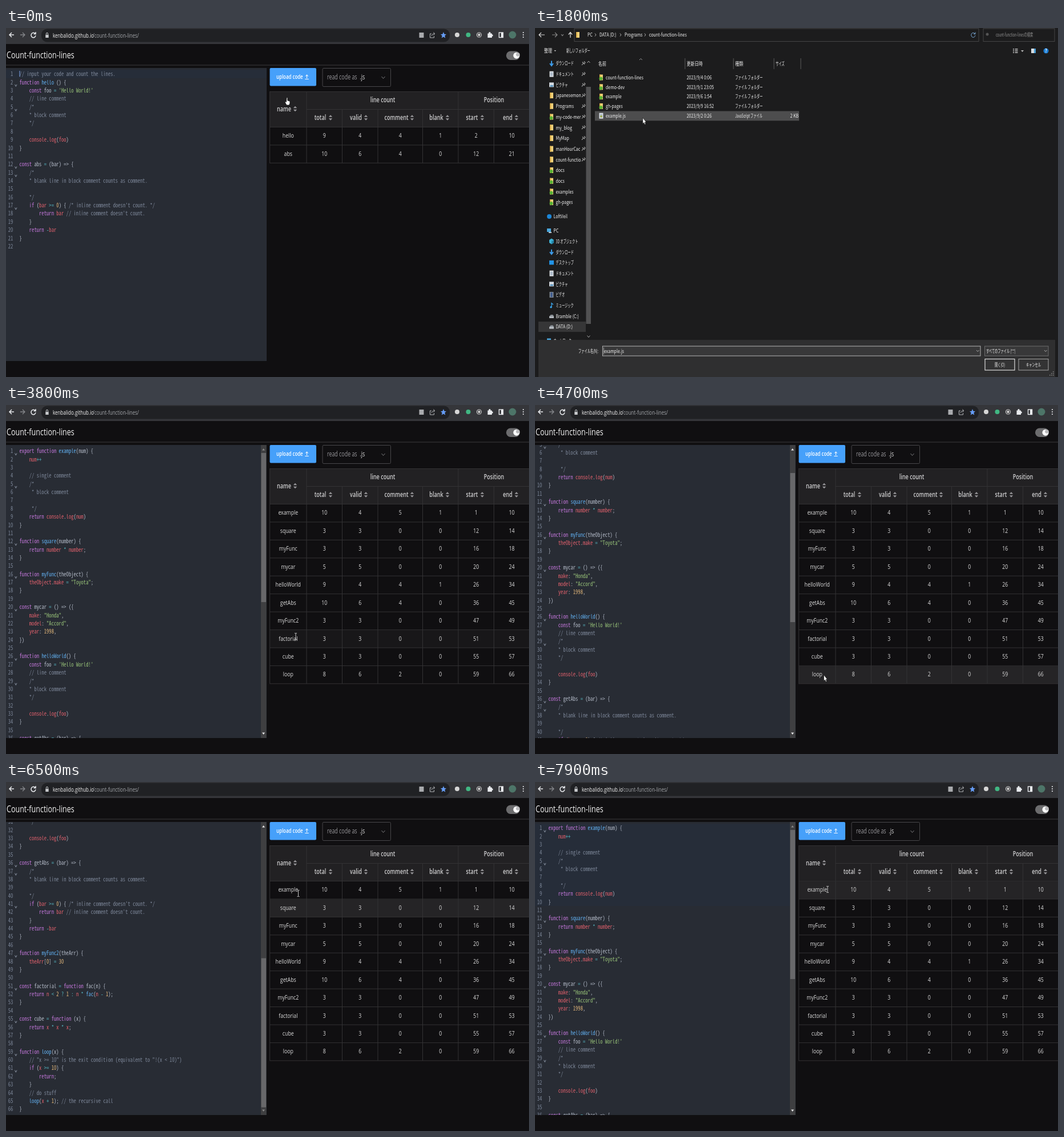
An HTML page for the animation above (8000 ms loop, 917 by 611 pixels).

```html
<!DOCTYPE html>
<html lang="en">
<head>
<meta charset="utf-8">
<title>Count-function-lines</title>
<style>
html, body { margin: 0; width: 100%; height: 100%; overflow: hidden; background: #100f11; }
svg { display: block; }
text { font-family: "Open Sans", "Noto Sans", sans-serif; white-space: pre; }
.ja { font-family: "Noto Sans CJK JP", "Noto Sans", sans-serif; }
.code { font-family: "Noto Sans Mono CJK JP", "Noto Sans Mono", monospace; font-size: 10.2px; fill: #b4bbc8; }
.com { fill: #7d8799; }
.str { fill: #98c379; }
.key { fill: #c678dd; }
.num { fill: #e5b97b; }
.op { fill: #56b6c2; }
.fn { fill: #61afef; }
.var { fill: #e0606c; }
</style>
</head>
<body>
<svg id="stage" width="917" height="611" viewBox="0 0 917 611" xmlns="http://www.w3.org/2000/svg"></svg>
<script>
const LOOP = 8000, LINE = 14.37, ROW = 31.44, SCROLL = 442;
const COLS = [462.5, 527, 589.5, 652, 730.5, 793, 855.5, 918];
const SQUEEZE = 0.76, KANA = 0.57;

const esc = s => String(s).replace(/&/g, '&amp;').replace(/</g, '&lt;');
const rect = (x, y, w, h, fill, more = '') =>
  `<rect x="${x}" y="${y}" width="${w}" height="${h}" fill="${fill}" ${more}/>`;
const path = (d, stroke, w = 1, fill = 'none') =>
  `<path d="${d}" stroke="${stroke}" stroke-width="${w}" fill="${fill}"/>`;
const dot = (x, y, r, fill) => `<circle cx="${x}" cy="${y}" r="${r}" fill="${fill}"/>`;
const at = (x, y, s) => `<g transform="translate(${x} ${y})">${s}</g>`;

// The whole screen is narrowed; y is the middle of the text.
function text(x, y, s, { size = 11.5, fill = '#dcdcdc', anchor = 'start', weight = 400, ja = false } = {}) {
  const k = /[ぁ-ヿ]/.test(s) ? KANA : SQUEEZE;
  return `<text transform="translate(${x} ${y + size * 0.36}) scale(${k} 1)" font-size="${size}" fill="${fill}"
    text-anchor="${anchor}" font-weight="${weight}" ${ja ? 'class="ja"' : ''}>${esc(s)}</text>`;
}

// ---------- code ----------
const helloBody = `    const foo = 'Hello World!'
    // line comment
    /*
    * block comment
    */

    console.log(foo)
}
`;
const absBody = `    /*
    * blank line in block comment counts as comment.

    */
    if (bar >= 0) { /* inline comment doesn't count. */
        return bar // inline comment doesn't count.
    }
    return -bar
}
`;
const firstCode = `// input your code and count the lines.
function hello () {
${helloBody}
const abs = (bar) => {
${absBody}`;
const secondCode = `export function example(num) {
    num++

    // single comment
    /*
     * block comment

     */
    return console.log(num)
}

function square(number) {
    return number * number;
}

function myFunc(theObject) {
    theObject.make = "Toyota";
}

const mycar = () => ({
    make: "Honda",
    model: "Accord",
    year: 1998,
})

function helloWorld() {
${helloBody}
const getAbs = (bar) => {
${absBody}
function myFunc2(theArr) {
    theArr[0] = 30
}

const factorial = function fac(n) {
    return n < 2 ? 1 : n * fac(n - 1);
}

const cube = function (x) {
    return x * x * x;
}

function loop(x) {
    // "x >= 10" is the exit condition (equivalent to "!(x < 10)")
    if (x >= 10) {
        return;
    }
    // do stuff
    loop(x + 1); // the recursive call
}`;

const TOKEN = /(\/\/.*|\/\*.*?(?:\*\/|$)|^\s*\*.*$)|('[^']*'|"[^"]*")|\b(export|function|const|return|if)\b|(\b\d+)|(=>|[<>]=?|[-+*?=]+| : )|([A-Za-z_]\w*)/g;
const KINDS = ['com', 'str', 'key', 'num', 'op', 'var'];

function nameKind(line, word, i) {
  if (/^(export |function)/.test(line)) return /function $/.test(line.slice(0, i)) ? 'fn' : '';
  if (/^\s*const/.test(line)) return '';
  const call = line[i + word.length] === '(' && line[i - 1] !== '.';
  return call ? 'fn' : 'var';
}

function paint(line) {
  let out = '', last = 0;
  for (const m of line.matchAll(TOKEN)) {
    let kind = KINDS[m.slice(1).findIndex(g => g !== undefined)];
    if (kind === 'var') kind = nameKind(line, m[0], m.index);
    if (m[0] === '=>') kind = '';
    out += esc(line.slice(last, m.index)) + `<tspan class="${kind}">${esc(m[0])}</tspan>`;
    last = m.index + m[0].length;
  }
  return out + esc(line.slice(last));
}

const pen = document.createElement('canvas').getContext('2d');
pen.font = '10.2px "Noto Sans Mono CJK JP", "Noto Sans Mono", monospace';
const charScale = 4.32 / pen.measureText('0').width;

function codeText(src) {
  return src.split('\n').map((line, i) => {
    const y = 84.2 + i * LINE;
    const put = (x, body, more = '') =>
      `<text class="code ${more}" transform="translate(${x} ${y}) scale(${charScale} 1)">${body}</text>`;
    const fold = /\{( \/\*.*)?$|^\s*\/\*$/.test(line);
    const n = String(i + 1);
    return put(12.4 - n.length * 4.32, n, 'com') + put(23.5, paint(line)) +
      (fold ? path(`M15.6 ${y + 0.2}l1.7 3.6 1.7-3.6`, '#8d96a6') : '');
  }).join('');
}

const band = (id, from, count) =>
  rect(0, 73.3 + (from - 1) * LINE, 457, count * LINE, '#262d39', `id="${id}"`);

// ---------- table ----------
const firstRows = [['hello', 9, 4, 4, 1, 2, 10], ['abs', 10, 6, 4, 0, 12, 21]];
const resultRows = [
  ['example', 10, 4, 5, 1, 1, 10], ['square', 3, 3, 0, 0, 12, 14], ['myFunc', 3, 3, 0, 0, 16, 18],
  ['mycar', 5, 5, 0, 0, 20, 24], ['helloWorld', 9, 4, 4, 1, 26, 34], ['getAbs', 10, 6, 4, 0, 36, 45],
  ['myFunc2', 3, 3, 0, 0, 47, 49], ['factorial', 3, 3, 0, 0, 51, 53], ['cube', 3, 3, 0, 0, 55, 57],
  ['loop', 8, 6, 2, 0, 59, 66]];
const mid = c => (COLS[c] + COLS[c + 1]) / 2;
const TOP = 173.5, BORDER = '#333234';

function table(rows, hover) {
  const end = TOP + rows.length * ROW;
  let s = '';
  rows.forEach((r, i) => {
    const y = TOP + i * ROW;
    if (hover) s += rect(462.5, y, 455, ROW, '#252426', `id="row${i}" opacity="0"`);
    s += path(`M462 ${y + ROW}H917`, BORDER);
    r.forEach((v, c) => s += text(mid(c), y + 14.8, v, { anchor: 'middle' }));
  });
  COLS.forEach(x => s += path(`M${x} ${TOP}V${end}`, BORDER));
  return s;
}

const sorter = (x, y) =>
  path(`M${x - 3.2} ${y - 1.2}l3.2-3.6 3.2 3.6zM${x - 3.2} ${y + 1.2}l3.2 3.6 3.2-3.6z`, 'none', 0, '#98979a');

function tableHead() {
  const o = { size: 12, weight: 600, anchor: 'middle', fill: '#cfcfd0' };
  let s = rect(462.5, 111, 455, 62.5, '#222123') +
    path('M462 111.5H917M527 142.5H917M462 173.5H917M462.5 111V173M527 111V173M793 111V173', BORDER) +
    path('M589.5 142V173M652 142V173M730.5 142V173M855.5 142V173', BORDER) +
    text(660.5, 126, 'line count', o) + text(855.5, 126, 'Position', o) +
    text(487.5, 141.5, 'name', o) + sorter(507, 141.5);
  [['total', 551, 569], ['valid', 613.5, 631], ['comment', 684.5, 712], ['blank', 754.5, 774],
   ['start', 817, 835], ['end', 879.5, 895]]
    .forEach(([label, x, sx]) => s += text(x, 157, label, o) + sorter(sx, 157));
  return s;
}

// A dimming sheet over the table with a turning arc and a caption.
const loading = () => rect(462, 111, 455, 126, '#000', 'fill-opacity="0.8"') +
  `<g transform="translate(690 178) scale(0.47 0.56)"><circle id="arc" r="20" fill="none"
    stroke="#409eff" stroke-width="2" stroke-linecap="round"/></g>` +
  text(690, 206, 'Counting...', { anchor: 'middle', fill: '#409eff' });

// ---------- browser ----------
function browser() {
  const w = '#e8eaed';
  return rect(0, 0, 917, 28, '#35363a') + rect(62, 1.5, 716, 23, '#202124', 'rx="10"') +
    path('M14 12H6m4-4l-4 4 4 4', w, 1.5) +
    path('M25 12h8m-4-4l4 4-4 4', '#85878b', 1.3) +
    path('M51 9.6a4 4.3 0 1 0 1 3.6M52 7v3.6h-3.4', w, 1.5) +
    rect(69.3, 12, 5.4, 5, '#c8cacd') + path('M70.5 12v-2a1.5 1.7 0 0 1 3 0v2', '#c8cacd') +
    text(82, 12.7, 'kenbalido.github.io', { size: 10.6, fill: '#f1f1f1' }) +
    text(152, 12.7, '/count-function-lines/', { size: 10.6, fill: '#a3a6aa' }) +
    rect(724.5, 8, 8, 9, '#a9abae') +
    path('M746 10h-2.5v7h7v-3M746.5 14c0-3 2-4 5-4m-2-2.5l2.2 2.5-2.2 2.5', '#b5b7ba') +
    path('M767 7l1.5 3.8 3.5.2-2.7 2.6 1 4-3.3-2.2-3.3 2.2 1-4-2.7-2.6 3.5-.2z', 'none', 0, '#669df6') +
    dot(791, 12, 4, '#d6d6d6') + dot(810.5, 12, 4, '#41b883') +
    dot(829.5, 12, 4.6, '#cfcfcf') + dot(829.5, 12, 3.5, '#35363a') + dot(829.5, 12, 2.3, '#cfcfcf') +
    rect(844.5, 9.5, 7.5, 7.5, w) + dot(848, 8.8, 1.7, w) + dot(852.2, 13, 1.7, w) +
    rect(864.5, 8, 7, 8.5, 'none', `stroke="${w}" stroke-width="1.4"`) + rect(868, 8, 3.5, 8.5, w) +
    dot(888, 12, 6.5, '#4d7568') +
    [8, 12, 16].map(y => dot(907, y, 1.1, w)).join('');
}

function page() {
  return browser() +
    text(1, 47.3, 'Count-function-lines', { size: 16.5, fill: '#f2f2f2' }) +
    path('M0 65H917', '#3d3b3c') +
    rect(877, 40.5, 24, 15.5, '#6c6c6e', 'rx="7.7"') + dot(895, 48.2, 5.5, '#fff') + dot(897.5, 46.5, 3.3, '#b9b9bb') +
    `<g clip-path="url(#pane)">${rect(0, 70, 457, 513, '#282c34')}
      <g id="codeA">${band('bandA', 1, 1)}${codeText(firstCode)}<path id="caret" d="M24 75v10" stroke="#7fa6ee"/></g>
      <g id="codeB"><g id="lines">${band('bandTop', 1, 1)}${band('bandFn', 1, 10)}${band('bandLoop', 59, 8)}${codeText(secondCode)}</g>
        ${rect(447, 70, 9.5, 513, '#3f3f41')}${rect(447.5, 84, 8.5, 261, '#68686a', 'id="thumb"')}
        <path id="up" d="M449 79.5l2.5-3.5 2.5 3.5z"/><path id="down" d="M449 573.5l2.5 3.5 2.5-3.5z"/></g></g>` +
    `<g id="button">${rect(462.5, 70, 81.5, 31.5, '#46a0fa', 'rx="2"')}
      ${text(474, 85.5, 'upload code', { size: 10.4, weight: 600, fill: '#fff' })}
      ${path('M524.3 89.5h6.4M527.5 88v-6m-2.3 2.6l2.3-2.8 2.3 2.8', '#fff')}</g>` +
    rect(555, 70.5, 119.5, 32, '#100f11', 'id="select" stroke="#48474a" rx="2"') +
    text(563, 86, 'read code as', { size: 11.7, fill: '#97969a' }) + text(620.5, 86, '.js', { size: 11.7 }) +
    path('M658.5 85l3 3.5 3-3.5', '#7b7b7e') +
    tableHead() + `<g id="rowsA">${table(firstRows)}</g><g id="rowsB">${table(resultRows, true)}</g>` +
    `<g id="spin">${loading()}</g>`;
}

// ---------- file dialog ----------
const folder = rect(-3, -5, 6, 10, '#f0d078') + rect(-3, -5, 2, 10, '#d9ac4a');
const sheet = rect(-3.5, -5, 7, 10, '#d8dde2') + path('M-2-2h4M-2 0h4M-2 2h4', '#6d8aa8', .8);
const drive = rect(-4, 0, 8, 3.5, '#b9bec4') + path('M-3.5 0l2-2.5h4l1.5 2.5z', 'none', 0, '#8d949b');
const icons = {
  folder, sheet, drive,
  git: folder + dot(-.5, 2, 3, '#58b435'),
  down: path('M0-4.5V3M-3 0l3 4 3-4', '#3d9be8', 2),
  pic: rect(-4, -4, 8, 8, '#d5dbe1') + path('M-3 3l2-3 2 1.5 2-1.5v3z', 'none', 0, '#3f86b8'),
  disc: dot(0, 0, 4, '#1c86d8'),
  pc: rect(-4, -4, 7, 6, '#4aa7dd') + rect(-1, 2, 5, 2, '#b9c4cc'),
  cube: path('M0-5l4 2.5v5L0 5l-4-2.5v-5z', 'none', 0, '#3fb3d6') + path('M0 0v5l4-2.5v-5z', 'none', 0, '#2384a8'),
  desk: rect(-4, -4, 8, 7.5, '#2293e6'),
  film: rect(-3.5, -5, 7, 10, '#7d8794') + rect(-1.5, -4, 3, 8, '#39588f'),
  note: path('M0 3V-4l3 2.5', '#3ba7ee', 1.3) + dot(-1, 3, 1.7, '#3ba7ee'),
  script: sheet + dot(0, 1, 2, '#9aa84a')
};
const label = (x, y, s, more = {}) => text(x, y, s, { size: 9.2, fill: '#f0f0f0', ja: true, ...more });

const places = [
  ['down', 'ダウンロード'], ['sheet', 'ドキュメント'], ['pic', 'ピクチャ'], ['folder', 'japanesemon'],
  ['folder', 'Programs'], ['git', 'my-code-mer'], ['folder', 'my_blog'], ['folder', 'MyMap'],
  ['folder', 'manHourCac'], ['folder', 'count-functio'], ['git', 'docs'], ['git', 'docs'],
  ['git', 'examples'], ['git', 'gh-pages']];
const drives = [
  ['cube', '3D オブジェクト'], ['down', 'ダウンロード'], ['desk', 'デスクトップ'], ['sheet', 'ドキュメント'],
  ['pic', 'ピクチャ'], ['film', 'ビデオ'], ['note', 'ミュージック'], ['drive', 'Bramble (C:)'], ['drive', 'DATA (D:)']];
const files = [
  ['git', 'count-function-lines', '2023/9/4 0:06'], ['git', 'demo-dev', '2023/9/1 23:05'],
  ['git', 'example', '2023/9/6 1:54'], ['git', 'gh-pages', '2023/9/9 16:52'],
  ['script', 'example.js', '2023/9/2 0:26']];

function sidebar() {
  const item = ([icon, name], x, y) => at(x, y, icons[icon]) + label(x + 7.5, y, name);
  const pin = y => path(`M82 ${y + 3}l2.5-3m-1.5-2.5l4 4m-1-5l2 2-2 2.5`, '#a9a9a9', 1.1);
  return `<g clip-path="url(#side)">` + rect(6, 514, 83, 18, '#363637') +
    places.map((p, i) => item(p, 29, 62 + i * 18.7) + (i < 10 ? pin(62 + i * 18.7) : '')).join('') +
    item(['disc', 'LoftVeil'], 25, 330) + item(['pc', 'PC'], 25, 355) +
    drives.map((p, i) => item(p, 29, 373.5 + i * 18.7)).join('') +
    item(['pc', 'ネットワーク'], 25, 547.5) + '</g>' +
    rect(89, 53, 9.5, 493, '#1b1b1c') + rect(89.5, 103, 8.5, 415, '#515152') +
    path('M91.5 61l2.5-3 2.5 3M91.5 538.5l2.5 3 2.5-3', '#a8a8a8');
}

function dialog() {
  const grey = '#8f8f8f', sep = '#454546';
  const arrows = path('M17 12H7m4-4l-4 4 4 4M62 17V7.5m-3.3 4l3.3-4 3.3 4', '#d8d8d8', 1.2) +
    path('M30 12h9m-4-4l4 4-4 4M46 11l2 2.5 2-2.5', '#8c8c8c', 1.1);
  const crumbs = [[92, 'PC'], [113, 'DATA (D:)'], [157, 'Programs'], [200, 'count-function-lines']]
    .map(([x, s]) => label(x, 12, s)).join('') +
    [106, 150, 193].map(x => path(`M${x - 1} 9.5l2 2.5-2 2.5`, '#b0b0b0')).join('');
  const list = files.map(([icon, name, date], i) => {
    const y = 86.5 + i * 16.8;
    return at(116, y, icons[icon]) + label(124, y, name) + label(266, y, date) +
      label(351, y, icon === 'git' ? 'ファイル フォルダー' : 'JavaScript ファイル');
  }).join('');
  return rect(0, 0, 917, 611, '#1c1c1d') +
    rect(69, 1, 709, 22.5, 'none', `stroke="${sep}"`) + rect(786, 1, 125, 22.5, 'none', `stroke="${sep}"`) +
    arrows + at(75, 12, folder) + crumbs +
    path('M771 9.8a3.5 4 0 1 0 .8 3M772 7.5v3h-3', '#7aa9d8') +
    label(808, 12, 'count-function-linesの検索', { fill: grey }) + dot(793, 11, 2.5, '#555') +
    label(16, 40, '整理') + path('M33.5 39l1.8 2 1.8-2z', 'none', 0, '#ccc') + label(55, 40, '新しいフォルダー') +
    path('M838 37h2m-2 3h2m-2 3h2m1.5-6h5m-5 3h5m-5 3h5', '#c9c9c9', 1.4) +
    path('M852 39l2.5 3 2.5-3z', 'none', 0, '#bbb') +
    rect(870, 36, 8, 8, '#d8dde2') + rect(875, 36, 3, 8, '#4aa0d8') +
    dot(896, 40, 4.5, '#1d7fd6') + label(896, 40, '?', { fill: '#fff', anchor: 'middle', weight: 700 }) +
    sidebar() +
    path('M263 53V72M348 53V72M419 53V72M466 53V72', '#5a5a5a') + path('M183 56l2.5-2.5 2.5 2.5', '#999') +
    [[111, '名前'], [266, '更新日時'], [351, '種類'], [422, 'サイズ']].map(([x, s]) => label(x, 62.5, s)).join('') +
    rect(105, 145.5, 358, 16.8, '#4d4d4e', 'id="pick"') + list + label(462, 153.7, '2 KB', { anchor: 'end' }) +
    rect(6, 546, 906, 65, '#2f2f30') + label(76, 565.5, 'ファイル名(N):') +
    rect(118.5, 557, 662.5, 17, '#383839', 'stroke="#b5b5b5"') + path('M774 564l2.3 2.5 2.3-2.5', '#aaa') +
    `<g id="typed">${label(121, 565.5, 'example.js')}</g>` + path('M120.5 559.5V571.5', '#bbb', .7) +
    rect(788.5, 557, 111.5, 17, '#383839', 'stroke="#6c6c6d"') + label(791, 565.5, 'すべてのファイル (*.*)') +
    path('M893 564l2.3 2.5 2.3-2.5', '#aaa') +
    rect(789, 579.5, 52, 19.5, '#333334', 'stroke="#dcdcdc" stroke-width="1.2"') + label(815, 589.5, '開く(O)', { anchor: 'middle' }) +
    rect(848, 579.5, 52, 19.5, '#333334', 'stroke="#a5a5a5"') + label(874, 589.5, 'キャンセル', { anchor: 'middle' }) +
    [[908, 601], [905, 604], [908, 604], [902, 607], [905, 607], [908, 607]].map(([x, y]) => rect(x, y, 1.5, 1.5, '#888')).join('');
}

// ---------- pointer ----------
const pointers = {
  hand: path('M-1 0.5c.5-1 1.5-1 1.8 0V5l4 1.2v3.5L3.5 13H-1L-3.5 8.5v-2l2 1z', '#111', .7, '#fff'),
  arrow: path('M0 0V10.5L2 8.5 3.4 12 5 11.2 3.6 8H6z', '#111', .6, '#fff'),
  beam: path('M-2-5.5h1.5L0-5l.5-.5H2M0-5V5M-2 5.5h1.5L0 5l.5.5H2', '#c4c4c4', 1)
};
const track = [
  [0, 493, 122, 'hand'], [350, 503, 90, 'hand'], [750, 503, 90, 'arrow'], [1000, 391, 261.5, 'arrow'],
  [1500, 168, 154, 'arrow'], [1900, 196, 158, 'arrow'], [2050, 200, 159, 'beam'], [2800, 200, 159, 'beam'],
  [3600, 440, 400, 'beam'], [3800, 508, 405, 'beam'], [3900, 508, 420, 'arrow'], [4150, 506.5, 472.5, 'arrow'],
  [5500, 506.5, 472.5, 'arrow'], [6200, 512, 235, 'arrow'], [6450, 512, 206, 'beam'], [6500, 512.5, 195, 'beam'],
  [6700, 513, 188, 'beam'], [LOOP, 513, 188, 'beam']];

function pointer(t) {
  const i = track.findIndex((k, j) => t >= k[0] && t < track[j + 1][0]);
  const a = track[i], b = track[i + 1], p = (t - a[0]) / (b[0] - a[0]);
  return { x: a[1] + (b[1] - a[1]) * p, y: a[2] + (b[2] - a[2]) * p, kind: a[3] };
}

const stage = document.getElementById('stage');
stage.innerHTML = `<defs><clipPath id="pane">${rect(0, 70, 457, 513, '#000')}</clipPath>
  <clipPath id="side">${rect(6, 53, 83, 493, '#000')}</clipPath></defs>
  ${rect(0, 0, 917, 611, '#100f11')}${page()}<g id="dialog">${dialog()}</g>
  <g id="pointer">${Object.entries(pointers).map(([k, s]) => `<g id="${k}">${s}</g>`).join('')}</g>`;

const el = {};
stage.querySelectorAll('[id]').forEach(n => el[n.id] = n);
const set = (id, name, v) => el[id].setAttribute(name, v);
const fade = (id, v) => set(id, 'opacity', v);
const show = (id, on) => set(id, 'display', on ? 'inline' : 'none');
const move = (id, x, y) => set(id, 'transform', `translate(${x} ${y})`);
const ramp = (t, a, b) => Math.min(1, Math.max(0, (t - a) / (b - a)));
const ease = p => p * p * (3 - 2 * p);

// Row shading follows the pointer with a short delay.
const LAGS = [60, 100, 140, 180, 220];
function rowAt(t) {
  const p = pointer(Math.max(0, t));
  return p.x > 462 && t > 2700 ? Math.floor((p.y - TOP) / ROW) : -1;
}

// The arc grows from a dot while the ring turns.
function turnArc(age) {
  const p = (age % 1500) / 1500, grow = ease(ramp(p, 0, .5)), leave = ease(ramp(p, .5, 1));
  set('arc', 'stroke-dasharray', `${1 + 89 * grow} 200`);
  set('arc', 'stroke-dashoffset', -40 * grow - 80 * leave);
  set('arc', 'transform', `rotate(${age * 0.18})`);
}

function draw(t) {
  const loaded = t >= 2100, counted = t >= 2600, busy = t >= 2000 && !counted;
  const s = ease(ramp(t, 4600, 5000)) - ease(ramp(t, 6900, 7350));

  show('codeA', !loaded);
  show('codeB', loaded);
  show('caret', t < 500);
  move('lines', 0, -SCROLL * s);
  move('thumb', 0, 224.5 * s);
  set('up', 'fill', s > 0 ? '#eee' : '#8a8a8a');
  set('down', 'fill', s < 1 ? '#eee' : '#8a8a8a');
  show('bandTop', t < 2700);
  show('bandLoop', t >= 5000 && t < 5900);
  show('bandFn', t >= 7300);

  fade('button', busy ? 0.66 : 1);
  set('select', 'fill', busy ? '#29292b' : '#100f11');
  show('rowsA', !counted);
  show('rowsB', counted);
  fade('spin', ramp(t, 2130, 2430) - ramp(t, 2500, 2700));
  turnArc(Math.max(0, t - 2180));

  const rows = LAGS.map(d => rowAt(t - d));
  resultRows.forEach((_, i) => fade('row' + i, rows.filter(r => r === i).length / LAGS.length));

  const open = Math.min(ramp(t, 860, 1045), 1 - ramp(t, 1930, 2080));
  show('dialog', open > 0);
  fade('dialog', open);
  show('pick', t >= 1500);
  fade('pick', t < 1700 ? 0.6 : 1);
  show('typed', t >= 1700);

  const p = pointer(t);
  move('pointer', p.x, p.y);
  for (const k in pointers) show(k, k === p.kind);
}

const start = performance.now();
function tick(now) {
  const t = Math.max(0, now - start) % LOOP;
  draw(Math.floor(t / 100) * 100);
  requestAnimationFrame(tick);
}
draw(0);
requestAnimationFrame(tick);
</script>
</body>
</html>
```
